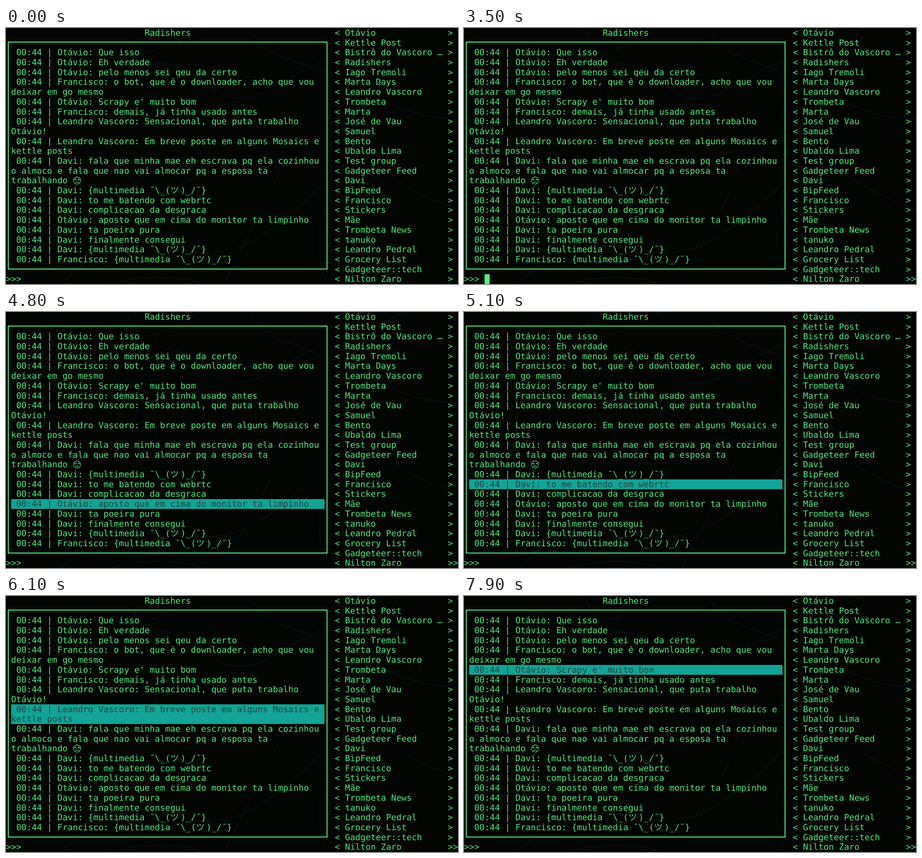
An HTML page that plays this animation: 994 by 564 pixels, repeating every 8000 ms.

```html
<!DOCTYPE html>
<html lang="pt">
<head>
<meta charset="utf-8">
<title>Terminal chat</title>
<style>
  html, body { margin: 0; width: 100%; height: 100%; overflow: hidden; background: #030503; }
  svg { display: block; width: 994px; height: 564px; color: #50e87b; }
  text {
    font: 18.76px "DejaVu Sans Mono", "Noto Sans CJK JP", "Noto Sans CJK", monospace;
    fill: currentColor; white-space: pre; text-rendering: geometricPrecision;
  }
  .chosen { color: #23423f; }
</style>
</head>
<body>
<svg id="stage" viewBox="0 0 994 564">
  <rect width="994" height="564" fill="#030503"/>
  <g fill="none" stroke-width="1.4">
    <g stroke="#03101c">
      <path d="M262 0Q305 75 318 150T330 285"/>
      <path d="M330 75Q400 85 450 130T570 140Q650 95 700 70"/>
      <path d="M540 0Q550 40 600 60T708 100"/>
      <path d="M610 260Q600 340 560 410T480 564"/>
      <path d="M720 360Q680 420 690 500T720 564"/>
      <path d="M770 110Q860 200 994 200"/>
      <path d="M850 330Q910 370 994 400"/>
    </g>
    <g stroke="#04130b">
      <path d="M0 150Q130 100 240 75T430 0"/>
      <path d="M120 564Q210 480 300 400T600 270"/>
      <path d="M330 470Q450 520 540 470T700 340"/>
      <path d="M230 564Q330 535 440 564"/>
      <path d="M720 80Q830 20 880 0"/>
    </g>
  </g>
  <rect id="bar" x="11.3" width="689" fill="#12a496"/>
  <rect x="5" y="31" width="701" height="500" fill="none" stroke="#50f07f" stroke-width="2"/>
  <rect id="cursor" width="11.3" height="21.7" fill="#50f07f"/>
</svg>
<script>
const NS = "http://www.w3.org/2000/svg";
const COL = 994 / 88, ROW = 564 / 26, LOOP = 8000;
const stage = document.getElementById("stage");
const bar = document.getElementById("bar");
const cursor = document.getElementById("cursor");

function add(tag, attrs, parent = stage) {
  const el = document.createElementNS(NS, tag);
  for (const key in attrs) el.setAttribute(key, attrs[key]);
  return parent.appendChild(el);
}

// Writes on the character grid; a full-width kana takes two cells.
function write(str, col, row, parent = stage) {
  const parts = str.split(/(ツ)/);
  let last;
  for (const part of parts) {
    last = add("text", { x: col * COL, y: row * ROW + 17 }, parent);
    last.textContent = part;
    col += part === "ツ" ? 2 : part.length;
  }
  return last;
}

function drawFace(x, y, parent) {
  const face = add("g", {
    transform: `translate(${x} ${y})`, fill: "none",
    stroke: "currentColor", "stroke-width": 1.2
  }, parent);
  add("circle", { r: 7.8 }, face);
  add("path", { d: "M-6 -2.5H-1.5M1.5 -2.5H6M-3.5 4.5Q0 1.8 3.5 4.5" }, face);
  add("path", { d: "M-4.5 -1.5H-2M2.5 -1.5H5", "stroke-width": 1.8 }, face);
}

const shrug = "{multimedia ¯\\_(ツ)_/¯}";
const messages = [
  ["Otávio: Que isso"],
  ["Otávio: Eh verdade"],
  ["Otávio: pelo menos sei qeu da certo"],
  ["Francisco: o bot, que é o downloader, acho que vou", "deixar em go mesmo"],
  ["Otávio: Scrapy e' muito bom"],
  ["Francisco: demais, já tinha usado antes"],
  ["Leandro Vascoro: Sensacional, que puta trabalho", "Otávio!"],
  ["Leandro Vascoro: Em breve poste em alguns Mosaics e", "kettle posts"],
  ["Davi: fala que minha mae eh escrava pq ela cozinhou",
    "o almoco e fala que nao vai almocar pq a esposa ta", "trabalhando "],
  ["Davi: " + shrug],
  ["Davi: to me batendo com webrtc"],
  ["Davi: complicacao da desgraca"],
  ["Otávio: aposto que em cima do monitor ta limpinho"],
  ["Davi: ta poeira pura"],
  ["Davi: finalmente consegui"],
  ["Davi: " + shrug],
  ["Francisco: " + shrug]
];

const chats = [
  "Otávio", "Kettle Post", "Bistrô do Vascoro …", "Radishers", "Iago Tremoli",
  "Marta Days", "Leandro Vascoro", "Trombeta", "Marta", "José de Vau", "Samuel",
  "Bento", "Ubaldo Lima", "Test group", "Gadgeteer Feed", "Davi", "BipFeed",
  "Francisco", "Stickers", "Mãe", "Trombeta News", "tanuko", "Leandro Pedral",
  "Grocery List", "Gadgeteer::tech", "Nilton Zaro"
];

write("Radishers", 27, 0);

let nextRow = 2;
const items = messages.map(lines => {
  const group = add("g", {});
  const row = nextRow;
  lines.forEach((line, i) => {
    if (i === 0) write("00:44 | " + line, 2, row, group);
    else write(line, 1, row + i, group);
    if (line === "trabalhando ") drawFace(156.3, (row + i) * ROW + 10.6, group);
  });
  nextRow += lines.length;
  return { group, row, count: lines.length };
});

chats.forEach((name, row) => {
  write("<", 64, row);
  write(name, 66, row);
  write(">", 86, row);
});
const extraMark = write(">", 87, 25);
write(">>>", 0, 25);
const input = write("", 4, 25);

// Each entry: start time, typed text (null hides the cursor).
const typing = [
  [0, null], [700, ""], [1200, "a"], [1300, "as"], [1400, "asd"], [1500, "asdas"],
  [1900, "asda"], [2100, "asd"], [2200, "a"], [2400, ""],
  [3100, null], [3500, ""], [3700, null]
];

// Each entry: start time, index of the chosen message.
const choices = [
  [0, -1], [3700, 15], [4100, 14], [4600, 13], [4800, 12], [4900, 11], [5100, 10],
  [5200, 9], [5400, 8], [6000, 7], [7100, 6], [7600, 5], [7900, 4]
];

const at = (steps, t) => steps.filter(step => step[0] <= t).pop()[1];
const show = (el, on) => el.setAttribute("visibility", on ? "visible" : "hidden");

function render(t) {
  const typed = at(typing, t);
  input.textContent = typed || "";
  show(cursor, typed !== null);
  cursor.setAttribute("x", (4 + (typed || "").length) * COL);
  cursor.setAttribute("y", 25 * ROW);
  show(extraMark, t >= 1200);

  const chosen = at(choices, t);
  items.forEach((item, i) => item.group.setAttribute("class", i === chosen ? "chosen" : ""));
  show(bar, chosen >= 0);
  if (chosen >= 0) {
    bar.setAttribute("y", items[chosen].row * ROW);
    bar.setAttribute("height", items[chosen].count * ROW);
  }
}

const start = performance.now();
function tick() {
  render((performance.now() - start) % LOOP);
  requestAnimationFrame(tick);
}
tick();
</script>
</body>
</html>
```
